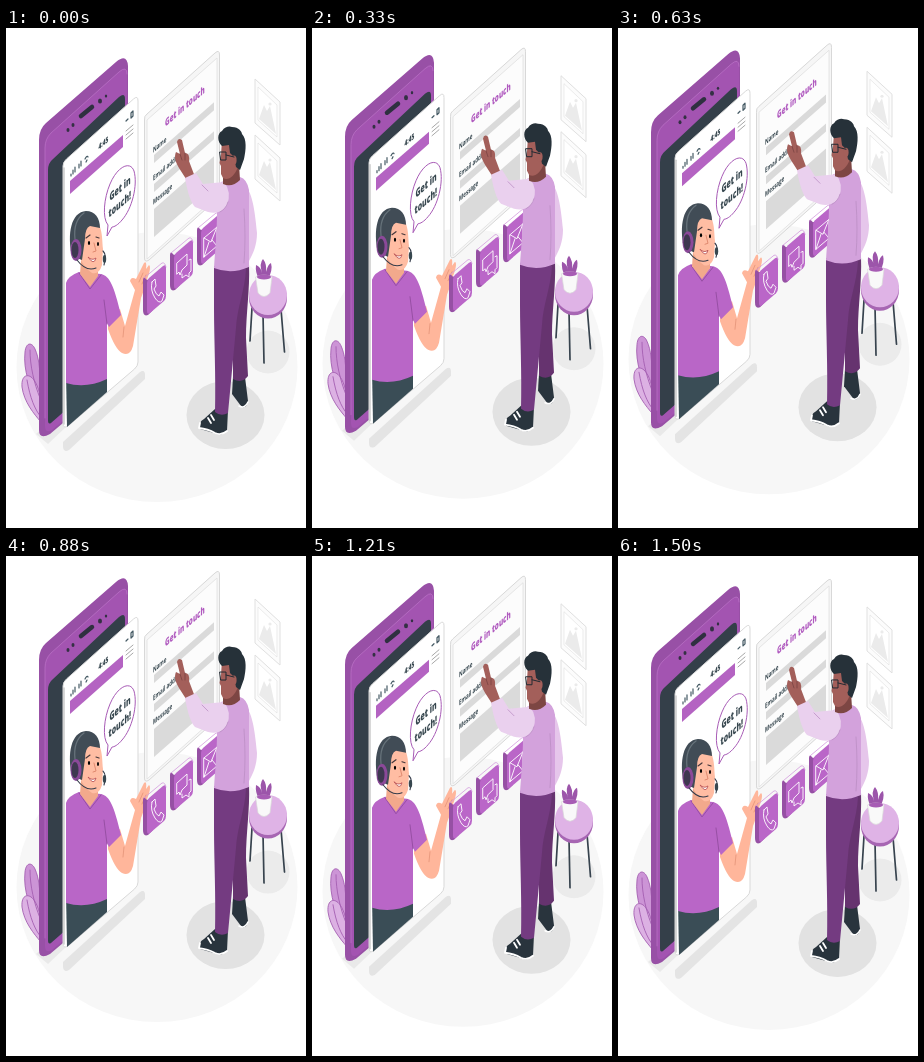
Write an HTML page that moves like this. It is 300 by 500 pixels and loops after 1.54 s.

```html
<!DOCTYPE html>
<html lang="en">
<head>
<meta charset="utf-8">
<title>Get in touch</title>
<style>
  html, body { margin: 0; width: 100%; height: 100%; overflow: hidden; background: #fff; }
  svg { display: block; width: 100vw; height: 100vh; }
  text { font-family: "Open Sans", sans-serif; font-weight: 800; fill: #37474f; }
  .small { font-size: 7.5px; font-weight: 700; }
  .line { fill: none; stroke-linecap: round; stroke-linejoin: round; }
</style>
</head>
<body>
<svg viewBox="0 0 300 500">
  <defs>
    <g id="tile">
      <path fill="#9650a4" d="M0 16Q-4 11-4 16V46Q-4 53 1 51L6 46 5 14Z"/>
      <path fill="#ba66c8" d="M0 19Q0 16 2 14L16 2Q19 0 19 3V32Q19 35 17 37L3 49Q0 51 0 47Z"/>
      <path class="line" stroke="#d49bdd" stroke-width=".8" d="M-3 14 15-1Q18-2 19 3"/>
    </g>
    <g id="picture" stroke="#e0e0e0" stroke-width="1">
      <path fill="#fcfcfc" d="M249 51 274 74V117L249 95Z"/>
      <path fill="#fff" stroke-width=".6" d="M252 59 271 77V109L252 92Z"/>
      <path fill="#ebebeb" stroke="none" d="M253 91 258 77 261 83 264 78 270 106Z"/>
      <circle cx="264" cy="76" r="1.6" fill="#ebebeb" stroke="none"/>
    </g>
  </defs>

  <g id="scene">
    <ellipse cx="151" cy="339" rx="140.5" ry="135" fill="#f7f7f7"/>
    <use href="#picture"/>
    <use href="#picture" y="56"/>

    <!-- leaves -->
    <g stroke="#a45fb1" stroke-width=".9">
      <path fill="#cc94d6" d="M34 376C24 362 17 342 19 324 20 314 26 314 29 321 33 330 34 341 34 354Z"/>
      <path fill="#dcb1e3" d="M35 394C28 386 18 374 16 359 15 346 23 345 28 352 33 359 35 370 36 382Z"/>
      <path class="line" d="M24 322C24 338 28 355 34 370M21 352C24 370 29 382 35 389"/>
    </g>

    <!-- phone -->
    <path fill="#e9e9e9" d="M30 406 48 390 62 397 42 416Z"/>
    <path fill="#9850a6" d="M33 112Q33 101 40 95L110 34Q121 25 122 38V340L44 406Q33 412 33 402Z"/>
    <path fill="#a354b1" d="M39 120Q39 111 45 105L113 44Q121 37 121 46V340L46 402Q39 406 39 398Z"/>
    <path class="line" stroke="#bd74c9" stroke-width=".7" d="M39 390V120Q39 111 45 105L113 44Q121 37 121 46"/>
    <path fill="#343f49" d="M42 142Q42 135 47 131L113 69Q119 64 119 71V330L45 395Q42 397 42 392Z"/>
    <path class="line" stroke="#2f3040" stroke-width="4.500" d="M75 88 86 79"/>
    <g fill="#343044">
      <ellipse cx="62" cy="102" rx="1.500" ry="2"/><ellipse cx="67" cy="97" rx="1.500" ry="2"/>
      <ellipse cx="94" cy="73" rx="2" ry="2.600"/><ellipse cx="100" cy="68" rx="1.200" ry="1.600"/>
    </g>

    <!-- call screen -->
    <path fill="#e4e4e4" d="M57 414 134 344Q139 341 139 347V351L63 422Q57 425 57 418Z"/>
    <path fill="#fff" stroke="#d9d9d9" d="M57 138Q57 134 60.500 131L127.500 71Q132 67 132 73V334Q132 338 128.500 341L62 398Q57 401 57 395Z"/>
    <path class="line" stroke="#cbcbcb" stroke-width="1.500" d="M58 140V396"/>
    <path fill="#b463c2" d="M64 153 117 107V119L64 166Z"/>
    <g class="line" stroke="#455a64" stroke-width="1.200">
      <path d="M65 148V146M67 146V142M69 144V139M73 140V136M75 138V133M79 131Q81 127 82 129M80 134 81 132"/>
      <path d="M120 93 122 91M125 90V85L127 83V88Z"/>
      <path stroke="#9e9e9e" stroke-width=".9" d="M120 103 127 97M120 107 127 101M120 111 127 105"/>
    </g>
    <text transform="matrix(.6 -.52 0 1 92.500 122)" font-size="8">4:45</text>

    <path fill="#fff" stroke="#a85bb6" d="M101 208 102 197C96 190 98 170 104 156 111 139 124 132 128 143 132 157 126 181 116 192 112 197 108 199 106 199Z"/>
    <g font-size="11.500">
      <text transform="matrix(.6 -.52 0 1 103.500 173.500)">Get in</text>
      <text transform="matrix(.6 -.52 0 1 102.500 190)">touch!</text>
    </g>

    <!-- agent -->
    <path fill="#3a4d56" d="M60 345H101V364L61 399Z"/>
    <path fill="#ffb69b" d="M102 287 114 281 119 298 129 262 124 253Q125 248 130 251L138 235Q141 232 140 241L143 237Q146 239 140 254 138 263 135 270L127 318Q124 329 116 325 109 321 102 301Z"/>
    <path class="line" stroke="#e08f73" stroke-width=".7" d="M133 254 137 245M136 256 140 247M118 299 117 309"/>
    <path fill="#b966c7" d="M60 255Q62 248 73 244L95 246C104 248 108 258 115 287L103 299 101 295V351Q80 361 60 355Z"/>
    <path class="line" stroke="#8e4a9b" stroke-width=".8" d="M101 296 98 272M73 245 84 261 95 247"/>
    <path fill="#f2a98c" d="M75 232 92 236V248L84 259 74 246Z"/>
    <path fill="#ffbda3" d="M74 197 93 196C97 206 96 214 97 221L96 237Q93 247 86 245 78 240 73 228Z"/>
    <path fill="#414c56" d="M66 228C61 206 65 184 80 183 89 183 94 190 94 200L84 198Q79 200 79 211L76 232Z"/>
    <path class="line" stroke="#66727a" stroke-width="1.300" d="M69 211Q67 193 78 185"/>
    <ellipse cx="70" cy="222" rx="5.500" ry="11" fill="#8b4999"/>
    <ellipse cx="69" cy="222" rx="3.500" ry="8" fill="#3e3850"/>
    <path class="line" stroke="#343b4a" stroke-width="1.100" d="M71 232Q80 244 90 240M97 223Q101 227 98 237"/>
    <ellipse cx="98.500" cy="231" rx="1.700" ry="4" fill="#37474f"/>
    <g class="line" stroke="#46383c">
      <path stroke-width="1.200" d="M80 210 84 207M90 209 93 210"/>
      <path stroke="#e08a70" d="M88 215 90 223 87 224"/>
    </g>
    <ellipse cx="83" cy="215" rx="1.100" ry="2"/><ellipse cx="92" cy="216" rx="1" ry="2"/>
    <path fill="#fff" stroke="#bd5556" stroke-width=".9" d="M82 229Q86 233 90 230 88 238 82 229Z"/>

    <!-- contact form -->
    <path fill="#f6f6f6" stroke="#d8d8d8" d="M138.500 92Q138 88 141 86L209 25Q213.500 21 213.500 27V166L210 172 143 232Q138.500 235 138.500 230Z"/>
    <path fill="#fcfcfc" stroke="#e0e0e0" stroke-width=".8" d="M141 92 211 30V168L141 231Z"/>
    <g transform="matrix(1 -.88 0 1 148 0)" fill="#dadada">
      <rect y="127" width="60" height="8"/>
      <rect y="156" width="60" height="8"/>
      <rect y="181" width="60" height="28"/>
    </g>
    <text transform="matrix(.6 -.52 0 1 159 99)" font-size="10.500" style="fill:#b05abf">Get in touch</text>
    <text class="small" transform="matrix(.6 -.52 0 1 147 125)">Name</text>
    <text class="small" transform="matrix(.6 -.52 0 1 147 153)">Email address</text>
    <text class="small" transform="matrix(.6 -.52 0 1 147 177)">Message</text>

    <!-- contact tiles -->
    <use href="#tile" x="141" y="236"/>
    <use href="#tile" x="168" y="211"/>
    <use href="#tile" x="195" y="186"/>
    <g class="line" stroke="#fff" stroke-width=".9">
      <path d="M146 254 149 251 150 258 148 261Q150 267 153 268L155 264 158 267 156 273Q153 276 149 270 144 262 146 254Z"/>
      <path d="M171 235 181 226V237L176 242 174 247 173 244 171 246ZM183 232 185 231V243L183 245V249L180 247 176 250V246"/>
      <path d="M198 210 211 199V218L198 229ZM198 210 205 214 211 199M198 229 203 214M211 218 206 212"/>
    </g>

    <!-- side table -->
    <ellipse cx="262" cy="324" rx="21.500" ry="21.500" fill="#ebebeb"/>
    <g class="line" stroke="#37434e" stroke-width="1.700">
      <path d="M246 280 244 313M257 286 258 335M275 281 278.500 324"/>
    </g>
    <ellipse cx="262" cy="270" rx="19" ry="20.500" fill="#a766b3"/>
    <ellipse cx="262" cy="267" rx="19" ry="20" fill="#dfb3e6"/>
    <path fill="#9c55aa" d="M253 251Q249 244 250 237 255 239 256 245 253 235 257 231 261 236 260 244 262 236 265 235 267 242 262 251Z"/>
    <path fill="#f9f9f9" stroke="#d9d9d9" stroke-width=".7" d="M249.500 249Q258 245 266 249L264 265Q258 272 252 265Z"/>
    <ellipse cx="258" cy="249" rx="7" ry="2.500" fill="#a75cb4"/>

    <!-- visitor -->
    <ellipse cx="219.500" cy="387" rx="39" ry="34" fill="#e2e2e2"/>
    <path fill="#29343d" d="M227 349 239 349 242 373Q240 382 235 378L226 366Z"/>
    <path class="line" stroke="#fff" stroke-width="1.500" d="M233 378Q239 381 242 374"/>
    <path fill="#29343d" d="M209 381 222 382 221 403Q215 409 208 405L194 401Q192 394 198 391Z"/>
    <path class="line" stroke="#fff" stroke-width="1.800" d="M194 395 193 400Q202 401 209 405 215 408 221 403M202 390 205 395M205 387 208 392"/>
    <path fill="#66336f" d="M221 240 243 237C244 262 240 285 240 310L242 348Q236 356 227 351L227 300Z"/>
    <path fill="#743b81" d="M208 238 240 241C239 262 231 280 230 300L222 385Q215 389 209 384C210 350 208 310 208 280Z"/>
    <path fill="#e6c6eb" d="M237 157C246 160 249 183 251 205 251 217 247 226 243 233L238 224 242 208Z"/>
    <path fill="#d3a2dc" d="M215 154 234 149Q241 151 243 162L243 239Q225 247 208 240C209 224 211 205 211 184Z"/>
    <path fill="#a35f5a" d="M182 154 173 140C169 133 168 129 170 124L174 126 171 114Q172 109 176 112L179 125Q184 125 183 133L189 149Z"/>
    <path class="line" stroke="#743f40" stroke-width=".7" d="M174 126 176 132M179 125 179 132"/>
    <path fill="#ead0ee" d="M179 150 190 145 197 156 218 154Q226 164 221 177 215 187 202 184L189 179Q183 173 179 150Z"/>
    <path class="line" stroke="#bc8ec5" stroke-width=".8" d="M196 157 202 163M214 184Q220 181 222 174M238 181Q240 210 238 235"/>
    <path fill="#7d4643" d="M217 142 233 136 234 152Q226 160 217 156Z"/>
    <path fill="#a35f5a" d="M216 112 231 113 232 139C228 149 222 153 217 150L215 146 215 138 213.500 135 215 127Z"/>
    <path fill="#263139" d="M216 118C211 114 211 105 216 103 219 98 224 98 226 99 233 99 236 104 236 106 241 111 240 122 238 131L234 142 230 139 228 129 224 125 223 117Z"/>
    <ellipse cx="228" cy="132" rx="2.600" ry="4.500" fill="#a35f5a"/>
    <path class="line" stroke="#222a32" stroke-width="1" d="M214 124H220V132H215ZM220 127 228 129"/>
  </g>
</svg>
<script>
  const LOOP = 1540, LIFT = 4.2;
  const scene = document.getElementById("scene");

  function draw(now) {
    const phase = (now % LOOP) / LOOP * 2 * Math.PI;
    const y = LIFT * (Math.cos(phase) - 1);
    scene.setAttribute("transform", `translate(0 ${y.toFixed(3)})`);
    requestAnimationFrame(draw);
  }
  draw(0);
</script>
</body>
</html>
```
